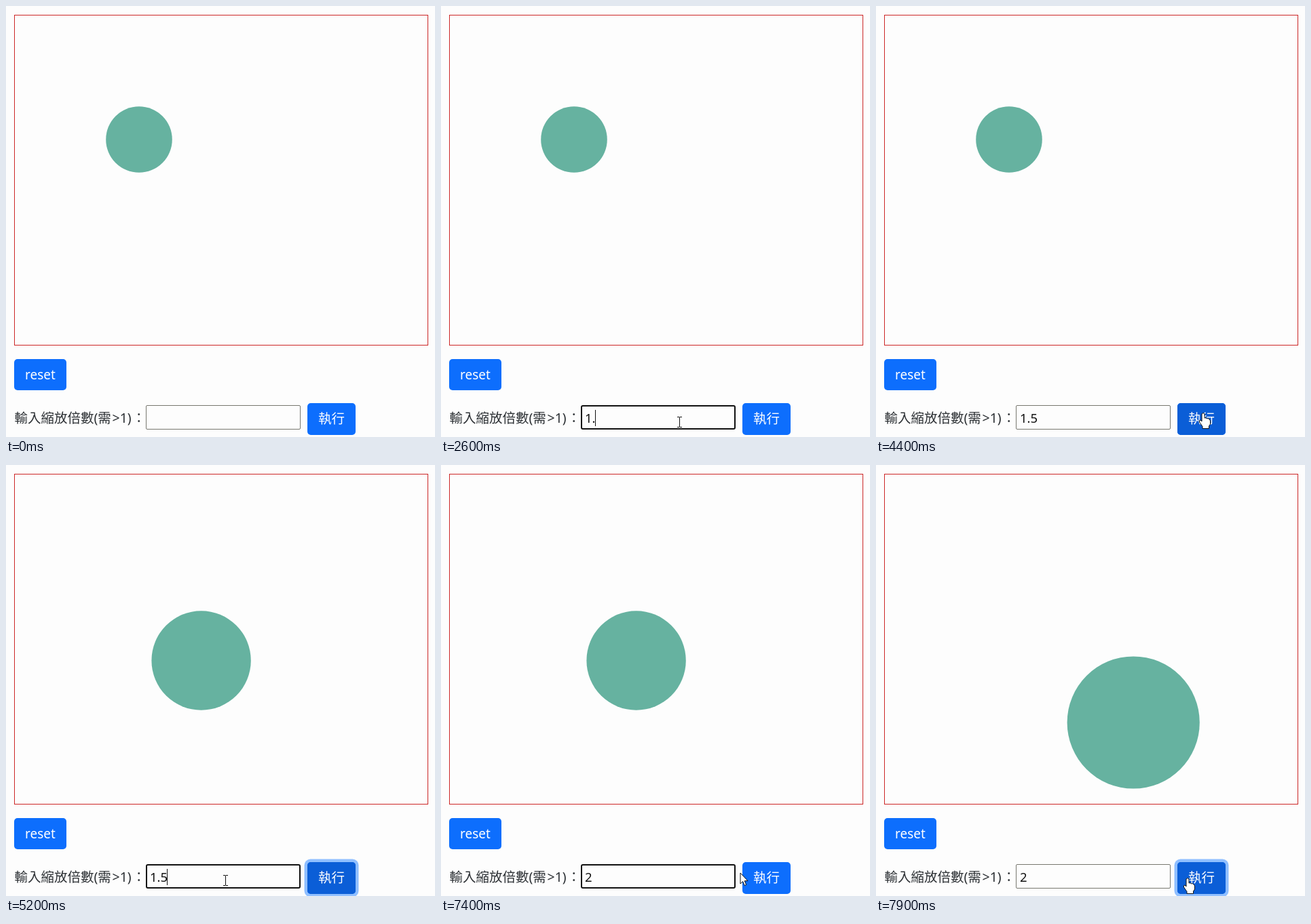
These frames come from a looping animation (632x636 px, 8 s). An HTML page:

```html
<!DOCTYPE html>
<html lang="zh-Hant">
<head>
<meta charset="utf-8">
<title>縮放</title>
<style>
  html, body { margin: 0; width: 100%; height: 100%; overflow: hidden; background: #fdfdfd; }
  svg { display: block; width: 632px; height: 636px; }
  text { font: 300 19.5px "Noto Sans", "Noto Sans CJK TC", "Noto Sans CJK", sans-serif; fill: #2c3034; white-space: pre; }
  .btn { fill: #0d6efd; }
  .btn-text { fill: #fff; }
  #reset { font-size: 19px; font-weight: 400; }
  #value { font-size: 18.5px; font-weight: 400; fill: #111; }
  .pointer { fill: #fff; stroke: #111; stroke-linejoin: round; }
</style>
</head>
<body>
<svg viewBox="0 0 632 636">
  <rect x="12.5" y="13.5" width="609" height="487" fill="none" stroke="#cc2626"/>
  <circle id="disc" fill="#66b2a0"/>

  <rect class="btn" x="12" y="521" width="77" height="46" rx="5"/>
  <text id="reset" class="btn-text" x="28" y="551">reset</text>

  <text x="12.5" y="615">輸入縮放倍數(需</text>
  <text x="156.5" y="615">&gt;1)</text>
  <text x="186" y="615">：</text>

  <rect id="field" fill="#fdfdfd"/>
  <text id="value" x="212" y="615"></text>
  <rect id="caret" y="596" width="1" height="24" fill="#111"/>

  <rect id="glow" x="439.5" y="581.5" width="80" height="56" rx="9" fill="#90bfff"/>
  <rect class="btn" x="444" y="586" width="71" height="47" rx="5"/>
  <rect id="lit" x="444" y="586" width="71" height="47" rx="5" fill="#0b5ed7"/>
  <text class="btn-text" x="460" y="616">執行</text>

  <g id="cursor">
    <path id="arrow" class="pointer" d="M0 0V16L3.7 12.5 6.2 18.5 8.7 17.4 6.2 11.7H11Z"/>
    <path id="beam" fill="none" stroke="#111" d="M-3 -7.5H0L.5 -7 1 -7.5H4M-3 7.5H0L.5 7 1 7.5H4M.5 -7V7"/>
    <path id="hand" class="pointer" d="M-2 2Q0 -1 2 2V8Q4 7 5.5 8.8 8 8 9 10 10.5 10.5 10.5 13V17L8.5 20V23.5H-1V20.5L-5.5 14Q-6.5 11 -4 11L-2 13Z"/>
  </g>
</svg>
<script>
  const LOOP = 8000, STEP = 100, FADE = 150;
  const $ = id => document.getElementById(id);
  const set = (id, attrs) => {
    for (const k in attrs) $(id).setAttribute(k, attrs[k]);
  };

  // time, shape, x, y
  const cursorTrack = [
    [0, ''], [100, 'arrow', 435, 434], [300, 'arrow', 415, 510], [400, 'beam', 390, 604], [500, ''],
    [800, 'arrow', 349, 629], [900, 'arrow', 349, 627],
    [1300, 'beam', 351, 618], [1400, 'beam', 351, 614],
    [3800, 'beam', 376, 612], [3900, 'beam', 402, 610], [4000, 'arrow', 436, 606],
    [4100, 'hand', 455, 603], [4200, 'hand', 470, 601], [4300, 'hand', 482, 600],
    [4900, 'hand', 470, 603], [5000, 'arrow', 437, 608], [5100, 'beam', 365, 611], [5200, 'beam', 323, 613],
    [7000, 'beam', 328, 613], [7100, 'beam', 350, 612], [7200, 'beam', 385, 609], [7300, 'beam', 418, 606],
    [7400, 'arrow', 441, 602], [7500, 'hand', 450, 604], [7600, 'hand', 459, 609]
  ];

  // time, text, caret shown
  const typing = [
    [0, '', 0], [1400, '', 1], [2000, '', 0], [2200, '1', 1], [2600, '1.', 1], [3100, '1.', 0],
    [3200, '1.5', 1], [3800, '1.5', 0], [5200, '1.5', 1], [5700, '1.5', 0], [5800, '1.', 1],
    [6000, '1', 1], [6100, '', 0], [6300, '', 1], [6500, '2', 1], [7000, '2', 0]
  ];

  const scaling = [[0, 1], [4500, 1.5], [7800, 2]];
  const focus = [[0, 0], [1400, 1], [4400, 0], [5200, 1], [7700, 0]];

  const at = (track, t) => track.filter(k => k[0] <= t).pop();
  const ramp = (t, start) => Math.min(1, Math.max(0, (t - start) / FADE));
  const pulse = (t, on, off) => ramp(t, on) - ramp(t, off);

  function draw(t) {
    const s = at(scaling, t)[1];
    set('disc', { cx: 12.8 + 183.2 * s, cy: 14 + 183 * s, r: 48.8 * s });

    const focused = at(focus, t)[1];
    set('field', focused
      ? { x: 207, y: 590, width: 226, height: 34, rx: 2, stroke: '#111', 'stroke-width': 2 }
      : { x: 206.5, y: 589.5, width: 227, height: 35, rx: 1.5, stroke: '#77776f', 'stroke-width': 1 });

    const [, text, caret] = at(typing, t);
    $('value').textContent = text;
    const width = text ? $('value').getComputedTextLength() : 0;
    set('caret', { x: Math.round(211 + width), opacity: caret });

    set('lit', { opacity: pulse(t, 4050, 5200) + ramp(t, 7450) });
    set('glow', { opacity: pulse(t, 4400, 5200) + ramp(t, 7700) });

    const [, shape, x = 0, y = 0] = at(cursorTrack, t);
    set('cursor', { transform: `translate(${x} ${y})` });
    for (const id of ['arrow', 'beam', 'hand']) {
      set(id, { visibility: id === shape ? 'visible' : 'hidden' });
    }
  }

  const start = performance.now();
  function tick() {
    const t = (performance.now() - start) % LOOP;
    draw(Math.floor(t / STEP) * STEP);
    requestAnimationFrame(tick);
  }
  tick();
</script>
</body>
</html>
```
